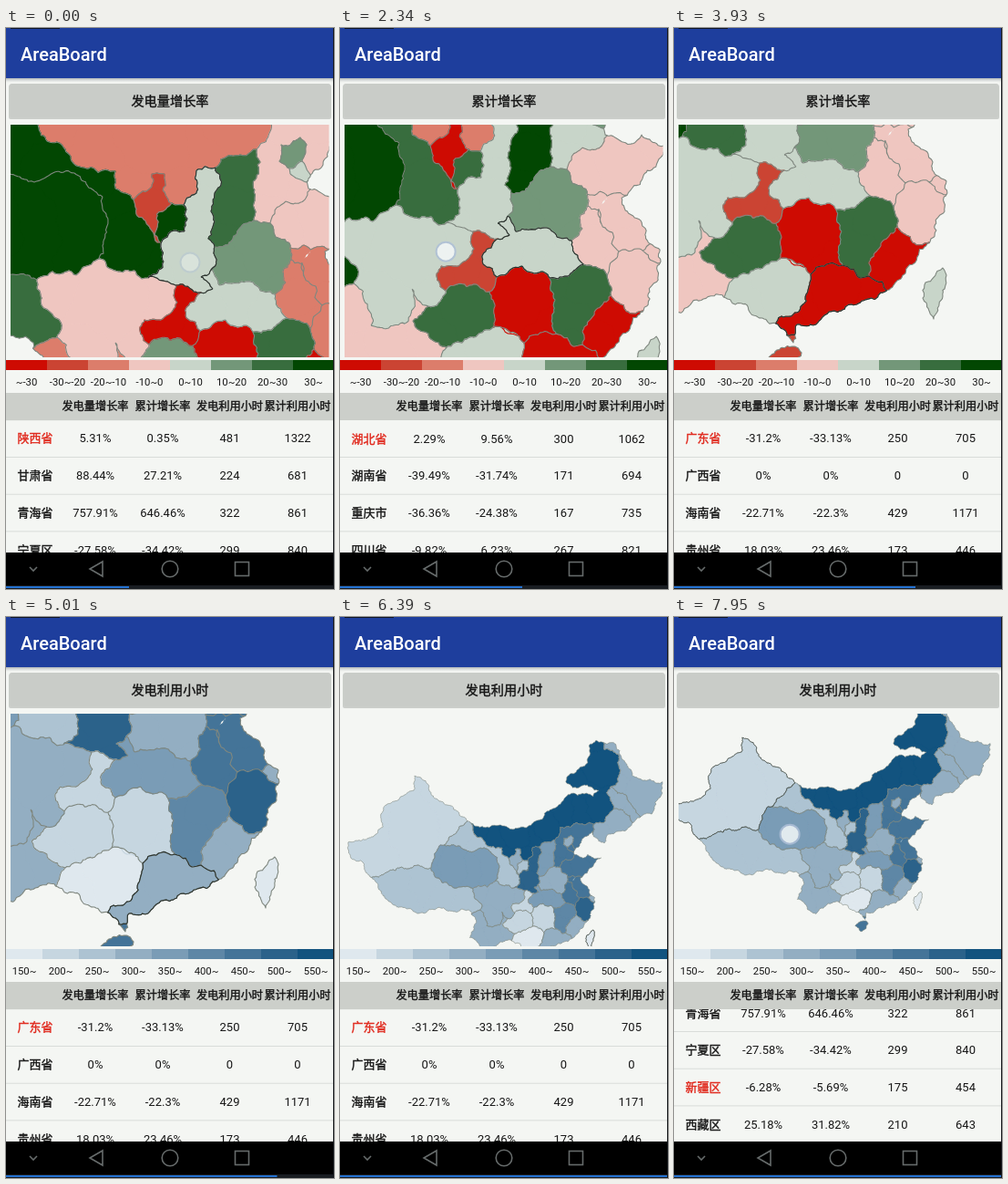
An HTML page that plays this animation: 360x615 px, repeating every 8000 ms.

```html
<!DOCTYPE html>
<html lang="zh">
<head>
<meta charset="utf-8">
<title>AreaBoard</title>
<style>
html, body { margin: 0; width: 100%; height: 100%; overflow: hidden; background: #f4f6f3; }
svg { display: block; width: 360px; height: 615px; }
text { font-family: Roboto, "Noto Sans CJK SC", "Noto Sans CJK", sans-serif; font-size: 13px; fill: #161616; text-anchor: middle; dominant-baseline: central; }
#app { font-size: 20px; font-weight: 500; fill: #fff; text-anchor: start; }
#heading { font-size: 14.2px; }
.label { font-size: 11.3px; }
.head { font-size: 12.2px; }
#heading, .head, .name { stroke: #161616; stroke-width: .4px; }
.name.picked { fill: #e0281c; stroke: #e0281c; }
#map path { vector-effect: non-scaling-stroke; stroke-linejoin: round; }
#borders, #coast, #outline { fill: none; stroke: #7f877f; }
#outline { stroke: #2c342f; }
#nav { fill: none; stroke: #666b6b; stroke-width: 1.6; }
</style>
</head>
<body>
<svg viewBox="0 0 360 615">
  <defs>
    <clipPath id="mapClip"><rect x="5" y="106" width="349.5" height="255"/></clipPath>
    <clipPath id="listClip"><rect y="430" width="360" height="145"/></clipPath>
    <clipPath id="landClip"><path id="land"/></clipPath>
    <clipPath id="pickedClip"><path id="picked"/></clipPath>
    <linearGradient id="shade" x2="0" y2="1">
      <stop stop-color="#8d9399" stop-opacity=".65"/><stop offset="1" stop-color="#c8ccca" stop-opacity="0"/>
    </linearGradient>
  </defs>
  <rect width="360" height="615" fill="#f4f6f3"/>
  <rect width="360" height="55" fill="#1e3e9d"/>
  <rect x="5" width="54" height="1" fill="#101625"/>
  <rect y="55" width="360" height="5" fill="url(#shade)"/>
  <text id="app" x="16" y="28.5">AreaBoard</text>
  <rect x="3" y="62" width="354" height="38" rx="2" fill="#b5b9b5" opacity=".65"/>
  <rect x="4" y="61" width="352" height="37" rx="2" fill="#c9ccc8"/>
  <text id="heading" x="180" y="80"></text>
  <g clip-path="url(#mapClip)">
    <g id="map">
      <g clip-path="url(#landClip)"><g id="fills"></g><path id="borders"/></g>
      <path id="coast"/>
      <g id="outline">
        <g clip-path="url(#landClip)"><path id="pickedBorder"/></g>
        <g clip-path="url(#pickedClip)"><path id="pickedCoast"/></g>
      </g>
    </g>
  </g>
  <g id="legends"></g>
  <g clip-path="url(#listClip)"><g id="list"></g></g>
  <rect y="400" width="360" height="30" fill="#cccfca"/>
  <g id="heads"></g>
  <rect y="575" width="360" height="40"/>
  <g id="nav">
    <path d="M26 591l4 4 4-4M106 585v16l-14-8z"/><circle cx="180" cy="593" r="8.8"/><rect x="251.500" y="585.500" width="15" height="15"/>
  </g>
  <rect y="611" width="360" height="4" fill="#191d22"/>
  <rect id="progress" y="612" height="2" fill="#2372d2"/>
  <rect x="359" width="1" height="615" fill="#15181c"/>
  <g id="touches" fill="#f4f8f8" stroke="#aebfd7" stroke-width="2"></g>
</svg>
<script>
const LOOP = 8000, ROW = 40.7, MAX_SCROLL = 423;
const $ = id => document.getElementById(id);

function add(parent, tag, attrs, text) {
  const node = document.createElementNS('http://www.w3.org/2000/svg', tag);
  for (const key in attrs) node.setAttribute(key, attrs[key]);
  if (text !== undefined) node.textContent = text;
  return parent.appendChild(node);
}

const growth = ['#ce0b02', '#cb4433', '#dc7d6b', '#efc6c0', '#c8d5c9', '#739779', '#386d3e', '#024702'];
const hours = ['#dfe8ee', '#c6d6e0', '#adc3d2', '#93aec2', '#7a9cb6', '#5e87a6', '#447498', '#2b628a', '#12537f'];
const growthLabels = ['~-30', '-30~-20', '-20~-10', '-10~0', '0~10', '10~20', '20~30', '30~'];
const hourLabels = hours.map((_, i) => 150 + 50 * i + '~');
const palettes = [growth, growth, hours];
const columns = ['发电量增长率', '累计增长率', '发电利用小时', '累计利用小时'];
const columnX = [98, 172, 245.5, 320];

// name, colour index per metric, discs (x,y,radius) that its territory grows from
const provinces = `内蒙古 228 72,92,38 110,105,50 142,168,17 190,170,18 165,110,50 215,115,38 250,95,45 300,50,50 350,50,45 400,35,45 385,-15,38 420,-80,45 380,-135,30
黑龙江 333 515,-85,50 490,-35,28 535,-20,50 450,-160,32
吉林 333 460,20,18 510,65,33 432,18,14
辽宁 333 455,75,28 410,120,28
新疆 331 -50,70,60 -150,130,75 -230,140,80 -110,185,28
西藏 672 -200,290,68 -110,265,47 -50,310,46 12,315,42
甘肃 762 5,120,36 45,150,20 100,168,13 122,200,18 130,235,32 155,255,16 182,214,17
青海 774 -45,210,38 -15,215,54 25,222,52 60,215,53 78,262,15
宁夏 103 168,168,7 160,192,17 159,217,9
河北 346 300,105,22 290,135,13 292,165,20 285,195,14 320,172,13 340,145,12 350,100,30
北京 543 312,138,13
天津 456 323,158,9
陕西 447 222,168,9 215,185,14 210,215,16 200,250,27 168,267,9 213,280,8
山西 674 265,142,11 255,160,22 250,195,23 238,222,14
山东 336 315,218,22 345,212,31 385,198,24
河南 553 250,258,24 278,248,34 295,275,16
江苏 236 320,246,6 345,262,18 362,285,19
安徽 236 312,270,14 318,295,22 330,315,13
上海 333 385,304,8
浙江 237 365,332,29
云南 233 50,373,20 124,358,10 95,425,40 50,425,35 130,410,25
贵州 561 180,370,31 150,385,22
广西 440 205,420,31 172,430,22
湖南 001 241,355,34 262,378,18 222,372,16
江西 665 310,345,24 288,343,13 295,375,22 298,395,13
福建 003 345,380,24 325,395,20
湖北 444 285,312,21 255,300,23 222,310,20 218,275,6
四川 343 110,300,45 160,297,21 62,290,27 92,355,28 138,345,15 45,262,8
重庆 011 205,298,10 180,328,14 160,333,9 200,335,7
广东 003 275,425,28 246,436,10 225,465,14 303,425,18
海南 116 213,497,20
台湾 440 380,425,30`;

const mainland = `29,84 72,97 193,97 238,73 286,31 313,1 388,6 404,-12 327,-20 308,-36 319,-60 372,-93 377,-146 396,-159
450,-150 471,-105 554,-45 592,-37 586,6 560,57 514,73 495,95 447,116 420,143 393,125 385,108 355,130 348,150 332,165 332,176
360,186 372,176 411,186 378,215 350,245 372,272 392,302 390,335 375,365 347,403 320,424 288,437 258,449 228,459 224,479 213,464 190,452
150,430 108,440 80,462 55,450 25,420 45,375 30,345 -129,349 -222,306 -284,220 -324,186 -332,140
-260,124 -230,95 -235,57 -182,14 -139,-12 -137,-55 -96,-28 -64,20 11,68`;
const islands = ['195,498 206,487 225,483 233,490 227,506 211,514', '366,430 372,412 388,397 392,405 388,428 378,453'];

const rows = `湖北省 2.29% 9.56% 300 1062
湖南省 -39.49% -31.74% 171 694
重庆市 -36.36% -24.38% 167 735
四川省 -9.82% 6.23% 267 821
广东省 -31.2% -33.13% 250 705
广西省 0% 0% 0 0
海南省 -22.71% -22.3% 429 1171
贵州省 18.03% 23.46% 173 446
陕西省 5.31% 0.35% 481 1322
甘肃省 88.44% 27.21% 224 681
青海省 757.91% 646.46% 322 861
宁夏区 -27.58% -34.42% 299 840
新疆区 -6.28% -5.69% 175 454
西藏区 25.18% 31.82% 210 643`.split('\n').map(line => line.split(' '));

const noise = (a, b) => {
  const v = Math.sin(a * 12.9898 + b * 78.233) * 43758.5453;
  return v - Math.floor(v) - .5;
};

// Midpoint displacement, the same in both directions so that neighbours share a border.
function ragged(a, b) {
  const len = Math.hypot(b.x - a.x, b.y - a.y);
  if (len < 4) return [a];
  const x = (a.x + b.x) / 2, y = (a.y + b.y) / 2;
  const mid = { x: x + len * .36 * noise(x, y), y: y + len * .36 * noise(y, x + 3) };
  return [...ragged(a, mid), ...ragged(mid, b)];
}

const next = (list, i) => list[(i + 1) % list.length];
const trace = points => 'M' + points.map(p => `${p.x.toFixed(1)} ${p.y.toFixed(1)}`).join('L');
const roughLoop = points => trace(points.flatMap((p, i) => ragged(p, next(points, i)))) + 'Z';
const parsePoints = text => text.trim().split(/\s+/).map(pair => {
  const [x, y, r] = pair.split(',').map(Number);
  return { x, y, r };
});

const power = (p, disc) => (p.x - disc.x) ** 2 + (p.y - disc.y) ** 2 - disc.r ** 2;

// Keeps the part of a cell nearer to disc than to rival; each corner knows who lies across its next edge.
function clipCell(cell, disc, rival) {
  return cell.flatMap((a, i) => {
    const b = next(cell, i);
    const fa = power(a, disc) - power(a, rival), fb = power(b, disc) - power(b, rival);
    const kept = fa <= 0 ? [a] : [];
    if ((fa <= 0) !== (fb <= 0)) {
      const p = fa / (fa - fb);
      kept.push({ x: mix(a.x, b.x, p), y: mix(a.y, b.y, p), across: fa <= 0 ? rival.name : a.across });
    }
    return kept;
  });
}

function mix(a, b, p) { return a + (b - a) * p; }

const areas = {}, discs = [];
for (const line of provinces.split('\n')) {
  const [name, codes, ...shape] = line.split(' ');
  areas[name] = { codes, fill: '', border: '' };
  for (const disc of parsePoints(shape.join(' '))) discs.push({ ...disc, name });
}
const world = [{ x: -600, y: -500 }, { x: 900, y: -500 }, { x: 900, y: 800 }, { x: -600, y: 800 }];
for (const disc of discs) {
  const cell = discs.reduce((c, rival) => rival === disc ? c : clipCell(c, disc, rival), world)
    .map(p => ({ ...p, x: Math.round(p.x), y: Math.round(p.y) }));
  if (!cell.length) continue;
  const area = areas[disc.name];
  area.fill += roughLoop(cell);
  cell.forEach((a, i) => {
    const b = next(cell, i);
    if (a.across && a.across !== disc.name) area.border += trace([...ragged(a, b), b]);
  });
}
for (const area of Object.values(areas)) area.path = add($('fills'), 'path', { d: area.fill });
$('borders').setAttribute('d', Object.values(areas).map(area => area.border).join(''));
const coastline = [mainland, ...islands].map(text => roughLoop(parsePoints(text))).join('');
for (const id of ['land', 'coast', 'pickedCoast']) $(id).setAttribute('d', coastline);

const legends = [[growth, growthLabels], [hours, hourLabels]].map(([colors, labels]) => {
  const group = add($('legends'), 'g', {}), w = 360 / colors.length;
  colors.forEach((fill, i) => {
    add(group, 'rect', { x: i * w, y: 364, width: w + .3, height: 11, fill });
    add(group, 'text', { x: (i + .5) * w, y: 388, class: 'label' }, labels[i]);
  });
  return group;
});

columns.forEach((label, i) => add($('heads'), 'text', { x: columnX[i], y: 415, class: 'head' }, label));
const names = rows.map(([name, ...values], i) => {
  const y = 450 + i * ROW;
  values.forEach((value, k) => add($('list'), 'text', { x: columnX[k], y }, value));
  add($('list'), 'rect', { x: 0, y: y + 20, width: 360, height: 1, fill: '#d9dcd9' });
  return add($('list'), 'text', { x: 32, y, class: 'name' }, name);
});

const metricSteps = [[0, 0], [480, 1], [4600, 2]];
// time, outlined area, highlighted row
const selectSteps = [[0, '陕西', 8], [1270, '四川', 3], [1740, '湖北', 0], [3150, '广东', 4], [5250, '台湾', 4], [7250, '新疆', 12]];
// time, scale, x, y
const views = [[0, 1, 0, 0], [1950, 1, 0, 0], [2840, 1, -93, -134], [5500, 1, -93, -134],
  [5850, .63, -15, 1], [6250, .3736, 133, 194.6], [6720, .3736, 133, 194.6], [7950, .3736, 126, 152.6]];
// start, end and the map point that the finger holds on to
const touches = [[0, 120, 202, 257], [1210, 1360, 112, 317], [1860, 2860, 157, 304], [5500, 6250, 173, 313],
  [5500, 6250, 297, 479], [6650, 7120, 83, 290], [7560, LOOP, 3, 229]]
  .map(hold => ({ hold, node: add($('touches'), 'circle', { r: 10.5 }) }));

const latest = (steps, t) => steps.findLast(step => step[0] <= t);

function viewAt(t) {
  const i = views.findLastIndex(v => v[0] <= t), a = views[i], b = views[i + 1] || a;
  const p = a === b ? 0 : (t - a[0]) / (b[0] - a[0]);
  return [1, 2, 3].map(k => mix(a[k], b[k], p));
}

let shownMetric, shownSelection;
function showMetric(metric) {
  if (metric === shownMetric) return;
  shownMetric = metric;
  $('heading').textContent = columns[metric];
  legends.forEach((g, i) => g.setAttribute('display', i === (metric > 1 ? 1 : 0) ? 'inline' : 'none'));
  for (const { codes, path } of Object.values(areas)) {
    const color = palettes[metric][codes[metric]];
    path.setAttribute('fill', color);
    path.setAttribute('stroke', color);
  }
}

function showSelection(selection) {
  if (selection === shownSelection) return;
  shownSelection = selection;
  const [, name, row] = selection;
  $('picked').setAttribute('d', areas[name].fill);
  $('pickedBorder').setAttribute('d', areas[name].border);
  names.forEach((node, i) => node.classList.toggle('picked', i === row));
  $('list').setAttribute('transform', `translate(0 ${-Math.min(row * ROW, MAX_SCROLL)})`);
}

function draw(now) {
  const t = now % LOOP, [scale, x, y] = viewAt(t);
  showMetric(latest(metricSteps, t)[1]);
  showSelection(latest(selectSteps, t));
  $('map').setAttribute('transform', `translate(${x} ${y}) scale(${scale})`);
  $('map').setAttribute('stroke-width', .3 + .8 * scale);
  $('progress').setAttribute('width', Math.min(360, 135 + 32.5 * Math.floor((t + 300) / 930)));
  for (const { hold: [start, end, mapX, mapY], node } of touches) {
    const held = t >= start && t < end, isTap = end - start < 200;
    node.setAttribute('opacity', held ? (isTap ? .4 : .85) : 0);
    node.setAttribute('cx', mapX * scale + x);
    node.setAttribute('cy', mapY * scale + y);
  }
}

const begin = performance.now();
function tick() {
  draw(performance.now() - begin);
  requestAnimationFrame(tick);
}
tick();
</script>
</body>
</html>
```
